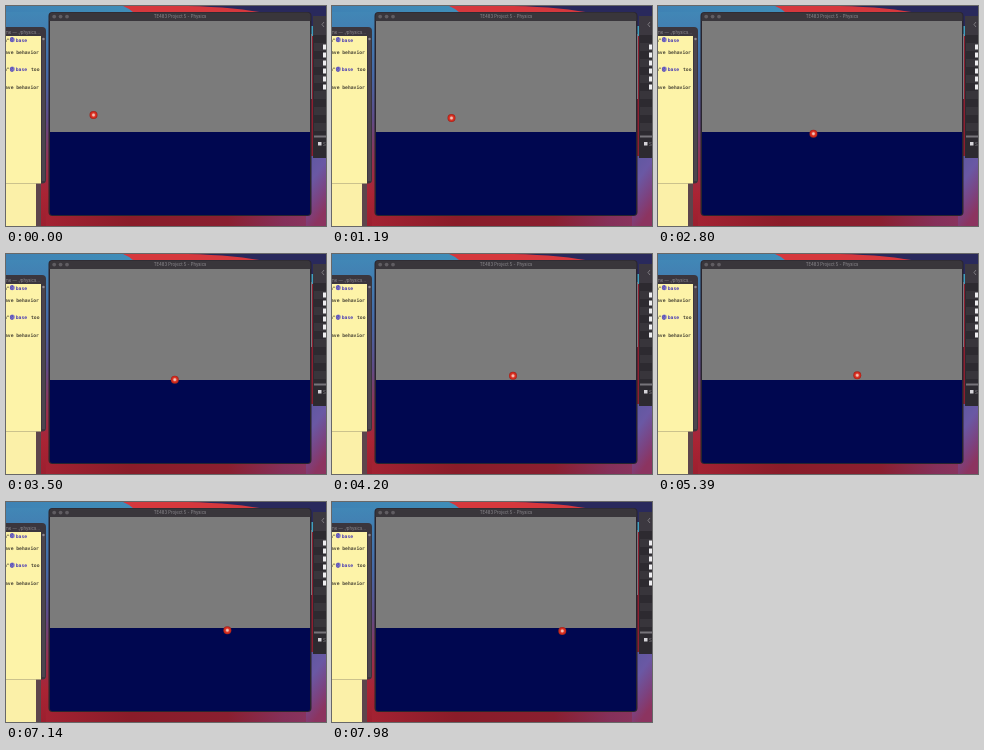
These frames come from a looping animation (320x220 px, 8 s). An HTML page:

```html
<!DOCTYPE html>
<html lang="en">
<head>
<meta charset="utf-8">
<title>Floating ball</title>
<style>
  html, body { margin: 0; width: 100%; height: 100%; overflow: hidden; background: #8d1f30; }
  svg { display: block; width: 100%; height: 100%; }
  .mono { font: bold 4.7px "DejaVu Sans Mono", monospace; fill: #4a4636; }
  .code { fill: #4a3cb4; }
  .ui { font: 4.3px Inter, sans-serif; fill: #8f8d91; }
</style>
</head>
<body>
<svg viewBox="0 0 320 220">
  <defs>
    <linearGradient id="sky">
      <stop offset="0" stop-color="#3f82b4"/>
      <stop offset="1" stop-color="#3fa0c0"/>
    </linearGradient>
    <linearGradient id="side" x2="0" y2="1">
      <stop offset="0" stop-color="#4187b6"/>
      <stop offset=".3" stop-color="#4668a6"/>
      <stop offset=".5" stop-color="#5f4c88"/>
      <stop offset=".7" stop-color="#97304f"/>
      <stop offset=".85" stop-color="#a92434"/>
      <stop offset="1" stop-color="#9c1f2f"/>
    </linearGradient>
    <linearGradient id="ground">
      <stop offset="0" stop-color="#a32232"/>
      <stop offset=".3" stop-color="#8a1c29"/>
      <stop offset=".65" stop-color="#8a1f30"/>
      <stop offset=".85" stop-color="#85305a"/>
      <stop offset="1" stop-color="#8c3660"/>
    </linearGradient>
    <linearGradient id="corner" x2=".4" y2="1">
      <stop offset="0" stop-color="#5c58a0"/>
      <stop offset=".4" stop-color="#6a58a4"/>
      <stop offset=".75" stop-color="#7c427f"/>
      <stop offset="1" stop-color="#8c3460"/>
    </linearGradient>
    <radialGradient id="red">
      <stop offset="0" stop-color="#f6cdc4"/>
      <stop offset=".25" stop-color="#f0b0a4"/>
      <stop offset=".5" stop-color="#dc3a2c"/>
      <stop offset=".8" stop-color="#cc2418"/>
      <stop offset="1" stop-color="#96261f"/>
    </radialGradient>
  </defs>

  <!-- Desktop -->
  <rect width="320" height="30" fill="url(#sky)"/>
  <path d="M117 0H320V20H140Q128 4 117 0Z" fill="#d6383d"/>
  <path d="M182 0Q230 1 264 8V20H320V0Z" fill="#29295c"/>
  <rect y="6" width="60" height="214" fill="url(#side)"/>
  <rect x="40" y="205" width="280" height="15" fill="url(#ground)"/>
  <rect x="300" y="150" width="20" height="70" fill="url(#corner)"/>

  <!-- Editor windows -->
  <rect y="176" width="30" height="44" fill="#fbf0a8"/>
  <rect x="30" y="176" width="5" height="44" fill="#5d454c"/>
  <path d="M0 21H36Q40 21 40 25V174Q40 177.5 36 177.5H0Z" fill="#3b363e"/>
  <rect y="30" width="35" height="147.5" fill="#fdf3a8"/>
  <path d="M37.5 32v143" stroke="#4c454f" stroke-width="3"/>
  <circle cx="37.5" cy="33" r="1.2" fill="#8f8a92"/>
  <text class="ui" x="-1" y="27.8">me — ./physics…</text>
  <g class="mono">
    <g id="lines"></g>
    <text x="25" y="65">too</text>
  </g>

  <!-- File browser -->
  <path d="M307 10H320V152H307Z" fill="#2d2a30"/>
  <path d="M314 37V128" stroke="#38353b" stroke-width="12" stroke-dasharray="8"/>
  <path d="M307 10H320V29H307Z" fill="#3c3840"/>
  <path d="M318 16l-2 2.5 2 2.5" fill="none" stroke="#97949a" stroke-width=".7"/>
  <path d="M308 130.5H320" stroke="#77747a" stroke-width="2"/>
  <path d="M318.5 38.5V84" stroke="#eeedf0" stroke-width="3" stroke-dasharray="5 3"/>
  <rect x="312" y="136" width="3.5" height="3.5" fill="#d5d3d8"/>
  <text class="ui" x="317" y="139.5">S</text>

  <!-- Simulation window -->
  <rect x="42.5" y="6" width="263" height="204" rx="4" fill="#29252e"/>
  <path d="M43.5 15V10Q43.5 6.5 47 6.5H301Q304.5 6.5 304.5 10V15Z" fill="#39363b"/>
  <path d="M305.5 28V93" stroke="#79767c"/>
  <g fill="#605d62">
    <circle cx="48.2" cy="10.6" r="1.9"/>
    <circle cx="54.6" cy="10.6" r="1.9"/>
    <circle cx="61" cy="10.6" r="1.9"/>
  </g>
  <text class="ui" x="174" y="12.2" text-anchor="middle">TE483 Project 5 - Physics</text>
  <rect x="44" y="15" width="260" height="111" fill="#7b7b7b"/>
  <path d="M44 126H304V207Q304 209 302 209H46Q44 209 44 207Z" fill="#000750"/>
  <circle id="ball" r="4" fill="url(#red)"/>
</svg>
<script>
const LOOP = 8000, STEP = 70;

// Height keys: seconds, y, vertical speed. Airborne stretches are parabolas.
const heights = [
  [0, 109, -0.6], [2.65, 126, 13.4], [3, 128.7, 0], [3.4, 126.4, -7.7],
  [4.85, 120.6, 0], [6.35, 126.2, 7.8], [6.8, 129.2, 0], [7.4, 127.6, 0], [8, 129, 3]
];

function heightAt(t) {
  const i = Math.max(1, heights.findIndex(key => t <= key[0]));
  const [t0, y0, v0] = heights[i - 1], [t1, y1, v1] = heights[i];
  const d = t1 - t0, u = (t - t0) / d, w = 1 - u;
  return w * w * ((1 + 2 * u) * y0 + u * d * v0) + u * u * ((1 + 2 * w) * y1 - w * d * v1);
}

// Drag slows the sideways drift exponentially.
const driftAt = t => 87.5 + 218 * (1 - Math.exp(-t / 7.5));

const row = y => `<text x="-1" y="${y}">ave behavior</text>`;
const baseRow = y => `<text x="-2" y="${y}">n"</text>
  <circle cx="6.3" cy="${y - 2}" r="2.5" fill="#8f88c4"/>
  <text class="code" x="3.9" y="${y - .3}" font-size="5.8">@</text>
  <text class="code" x="9.8" y="${y}">base</text>`;
document.getElementById("lines").innerHTML = baseRow(35.7) + row(47.5) + baseRow(65) + row(82.5);

const ball = document.getElementById("ball");
function draw() {
  const t = Math.floor(performance.now() % LOOP / STEP) * STEP / 1000;
  ball.setAttribute("cx", driftAt(t));
  ball.setAttribute("cy", heightAt(t));
  requestAnimationFrame(draw);
}
draw();
</script>
</body>
</html>
```
